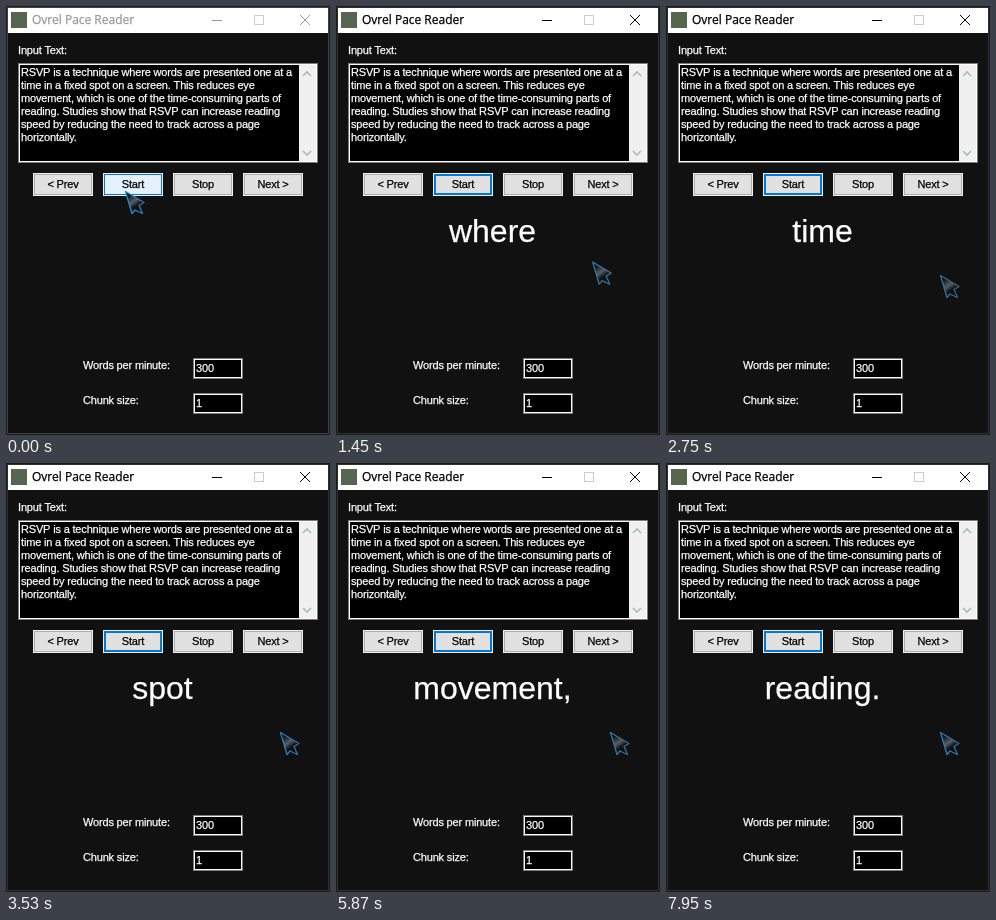
These frames come from a looping animation (324 by 429 pixels, 7990 ms). An HTML page with a canvas:

```html
<!DOCTYPE html>
<html lang="en">
<head>
<meta charset="utf-8">
<title>Speed reader</title>
<style>
  html, body { margin: 0; width: 100%; height: 100%; overflow: hidden; background: #111; }
  canvas { display: block; }
</style>
</head>
<body>
<canvas id="stage" width="324" height="429"></canvas>
<script>
const ctx = document.getElementById('stage').getContext('2d');

const LOOP = 7990;
const PRESS = 380, RELEASE = 475, LEAVE = 850;
const WORD_MS = 202, PAUSE = 3;
const UI_FONT = '11px "Liberation Sans", Arial, sans-serif';
const TITLE_FONT = '12px "Open Sans", sans-serif';
const WORD_FONT = '32px "Liberation Sans", Arial, sans-serif';

const lines = [
  'RSVP is a technique where words are presented one at a',
  'time in a fixed spot on a screen. This reduces eye',
  'movement, which is one of the time-consuming parts of',
  'reading. Studies show that RSVP can increase reading',
  'speed by reducing the need to track across a page',
  'horizontally.'
];

// Words that end in punctuation stay on longer.
let clock = RELEASE;
const words = lines.join(' ').split(' ').map(text => {
  const start = clock;
  clock += WORD_MS * (/[.,]$/.test(text) ? PAUSE : 1);
  return { text, start, end: clock };
});

const clamp = v => Math.max(0, Math.min(1, v));
const easeOut = (u, power) => 1 - (1 - u) ** power;
const mix = (a, b, k) => `rgb(${a.map((v, i) => Math.round(v + (b[i] - v) * k))})`;

function rect(x, y, w, h, color) {
  ctx.fillStyle = color;
  ctx.fillRect(x, y, w, h);
}

function frame(x, y, w, h, ...colors) {
  colors.forEach((color, i) => rect(x + i, y + i, w - 2 * i, h - 2 * i, color));
}

// A hairline stroke gives the letters the weight of screen-hinted text.
function text(str, x, y, color = '#fff', font = UI_FONT, align = 'left') {
  ctx.font = font;
  ctx.letterSpacing = font === UI_FONT ? '-0.17px' : '0px';
  ctx.textAlign = align;
  ctx.fillStyle = ctx.strokeStyle = color;
  ctx.lineWidth = 0.25;
  ctx.fillText(str, x, y);
  ctx.strokeText(str, x, y);
}

function polyline(points, color, width = 1) {
  ctx.beginPath();
  points.forEach(([x, y]) => ctx.lineTo(x, y));
  ctx.strokeStyle = color;
  ctx.lineWidth = width;
  ctx.stroke();
}

const inputBox = (x, y, w, h) => frame(x, y, w, h, '#7a7a7a', '#fff', '#000');

function button(label, x, face = '#e1e1e1', edge = '#adadad', innerEdge = face) {
  frame(x, 167, 60, 23, '#f0f0f0', edge, innerEdge, face);
  text(label, x + 30, 182, '#000', UI_FONT, 'center');
}

function drawWindow(active) {
  const ink = active ? '#000' : '#999';
  frame(0, 0, 324, 429, '#1a1a1a', active ? '#303030' : '#444', '#111');
  rect(2, 2, 320, 25, '#fff');
  rect(5, 6, 16, 16, '#56664f');
  text('Ovrel Pace Reader', 26, 18, ink, TITLE_FONT);
  rect(206, 14, 10, 1, ink);
  ctx.strokeStyle = '#ccc';
  ctx.lineWidth = 1;
  ctx.strokeRect(248.5, 9.5, 9, 9);
  polyline([[294, 9], [304, 19]], ink);
  polyline([[304, 9], [294, 19]], ink);
}

function drawTextArea() {
  text('Input Text:', 12, 48);
  inputBox(12, 57, 300, 100);
  lines.forEach((line, i) => text(line, 15, 70 + 13 * i));
  rect(293, 59, 17, 96, '#f0f0f0');
  polyline([[297, 70], [301, 66], [305, 70]], '#9fc0b5', 1.6);
  polyline([[297, 145], [301, 149], [305, 145]], '#9fc0b5', 1.6);
}

function drawButtons(t) {
  button('< Prev', 27);
  button('Stop', 167);
  button('Next >', 237);
  if (t < PRESS) return button('Start', 97, '#e5f1fb', '#0078d7');
  if (t < RELEASE) return button('Start', 97, '#cce4f7', '#005499');
  const fade = clamp((t - LEAVE) / 200);
  const hot = [229, 241, 251];
  button('Start', 97, mix(hot, [225, 225, 225], fade), '#0078d7', mix(hot, [0, 120, 215], fade));
}

function drawField(label, value, y) {
  text(label, 77, y + 11);
  inputBox(187, y, 50, 21);
  text(value, 190, y + 14);
}

function drawPointer(t) {
  const u = clamp((t - LEAVE) / 1250);
  const glow = 0.5 - 0.5 * Math.cos((t - 2750) / 1100 * 2 * Math.PI);
  ctx.save();
  ctx.translate(119.5 + 155 * easeOut(u, 3.3), 185.5 + 84 * easeOut(u, 2.8));
  ctx.beginPath();
  [[0, 0], [18.5, 11], [13.5, 14], [17, 22], [9.5, 18.5], [6.5, 22]].forEach(([x, y]) => ctx.lineTo(x, y));
  ctx.closePath();
  const body = ctx.createLinearGradient(3, 3, 14, 19);
  body.addColorStop(0, '#08090b');
  body.addColorStop(0.45, '#5a5c60');
  body.addColorStop(0.7, '#141518');
  body.addColorStop(1, '#08090b');
  ctx.fillStyle = body;
  ctx.fill();
  const rim = ctx.createLinearGradient(2, 14, 18, 8);
  rim.addColorStop(0, mix([45, 115, 165], [35, 140, 215], glow));
  rim.addColorStop(1, mix([70, 95, 115], [40, 115, 175], glow));
  ctx.strokeStyle = rim;
  ctx.lineWidth = 1.3;
  ctx.lineJoin = 'round';
  ctx.stroke();
  ctx.restore();
}

function draw(t) {
  drawWindow(t >= PRESS);
  drawTextArea();
  drawButtons(t);
  drawField('Words per minute:', '300', 352);
  drawField('Chunk size:', '1', 387);
  const word = words.find(w => t >= w.start && t < w.end);
  if (word) text(word.text, 156.5, 236, '#fff', WORD_FONT, 'center');
  drawPointer(t);
}

function tick() {
  draw(performance.now() % LOOP);
  requestAnimationFrame(tick);
}
tick();
</script>
</body>
</html>
```
